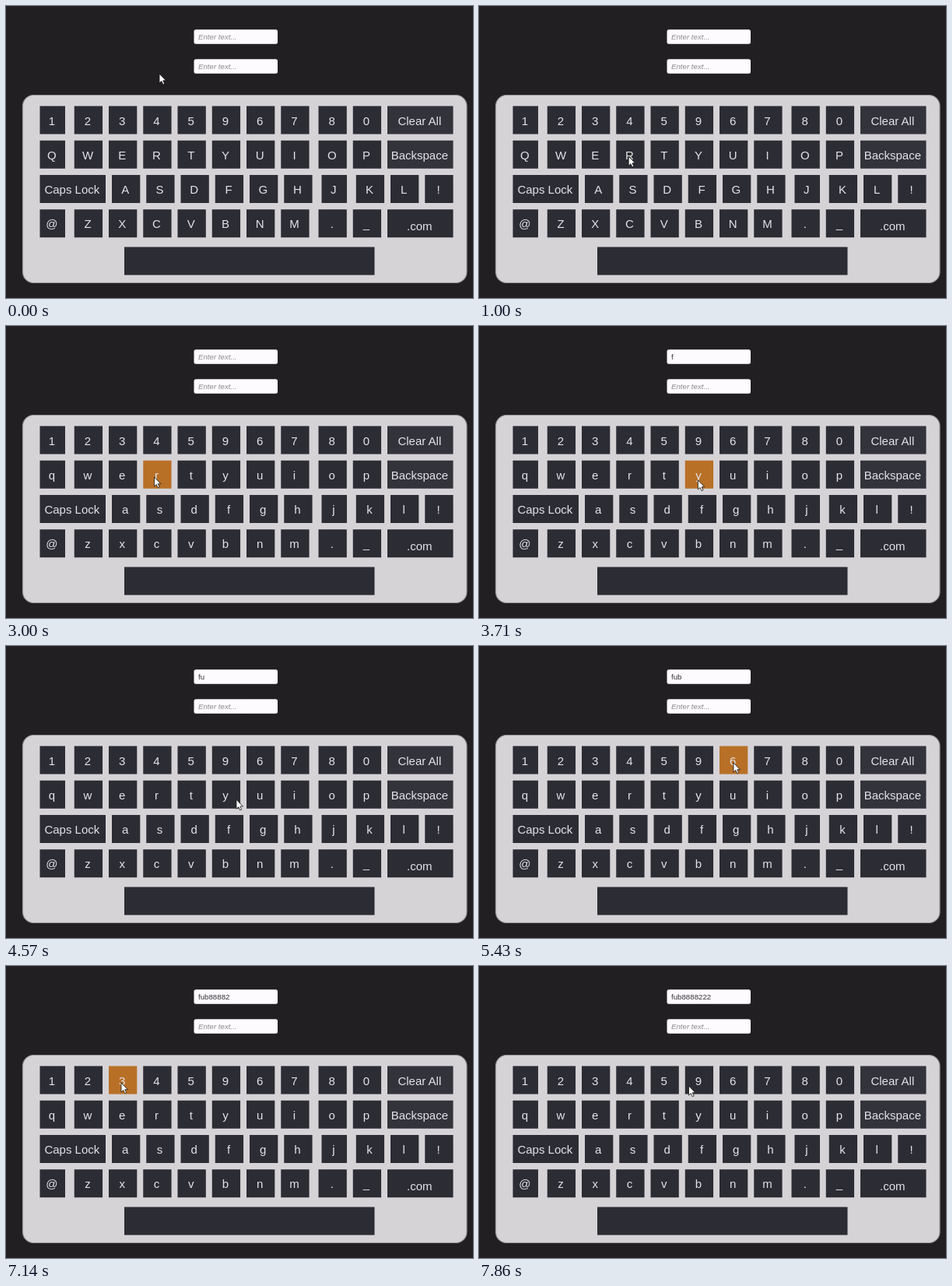
Recreate the animation shown at these times as an HTML page. Size 600 px wide and 375 px high, loop 8 s.

```html
<!DOCTYPE html>
<html lang="en">
<head>
<meta charset="utf-8">
<title>On-screen keyboard</title>
<style>
  html, body { margin: 0; width: 100%; height: 100%; overflow: hidden; background: #221f22; }
  svg { display: block; width: 100vw; height: 100vh; }
  text { font-family: "Liberation Sans", Arial, sans-serif; }
  .label { font-size: 15px; fill: #e4e3e8; text-anchor: middle; }
  .entry { font-size: 9.7px; fill: #333136; }
  .hint { font-style: italic; fill: #8d8a90; }
</style>
</head>
<body>
<svg viewBox="0 0 600 375">
  <rect width="600" height="375" fill="#221f22"/>
  <rect x="21.5" y="114.5" width="570.5" height="241" rx="14" fill="#d6d3d7" stroke="#98959a" stroke-width="1.2"/>
  <g id="fields"></g>
  <g id="keys"></g>
  <path id="cursor" d="M0 0V12L2.8 9.5L4.7 13.7L6.7 12.8L4.8 8.7H8.4Z" fill="#fff" stroke="#111" stroke-width=".8"/>
</svg>
<script>
const LOOP = 8000, STEP = 1000 / 7, CAPS_OFF = 1860;
const PITCH = 44.25, GAP = 4, LEFT = 43.5, TOP = 128.5;
const KEY_COLOR = "#2c2c34", WIDE_COLOR = "#33333b", HOT_COLOR = "#b87027";
const HINT = "Enter text...";
const $ = id => document.getElementById(id);

function add(parent, tag, attrs, content = "") {
  const node = document.createElementNS("http://www.w3.org/2000/svg", tag);
  for (const name in attrs) node.setAttribute(name, attrs[name]);
  node.textContent = content;
  return parent.appendChild(node);
}

const rows = [
  [..."1234596780", "Clear All"],
  [..."QWERTYUIOP", "Backspace"],
  ["Caps Lock", ..."ASDFGHJKL!"],
  [..."@ZXCVBNM._", ".com"]
];

const keyWidth = label => label.length > 1 ? 84.5 : "1Q@J".includes(label) ? 32.5 : 36.3;

const keys = rows.flatMap((labels, row) => {
  const y = TOP + row * PITCH;
  let column = 0;
  return labels.map(label => {
    const width = keyWidth(label);
    // Keys stand on a grid with a gap before column 8; a leading wide key pushes its row right.
    const pushed = labels[0].length > 1 && column > 0;
    const x = LEFT + column * PITCH + (column > 7 ? GAP : 0) + (pushed ? GAP : 0);
    column += label === "Caps Lock" ? 2 : 1;
    const fill = /Clear|Back/.test(label) ? WIDE_COLOR : KEY_COLOR;
    const box = add($("keys"), "rect", { x, y, width, height: 36, fill });
    const base = y + (label === ".com" ? 26.5 : 24.2);
    const text = add($("keys"), "text", { class: "label", x: x + width / 2 - 0.9, y: base }, label);
    return { label, box, text, fill };
  });
});
add($("keys"), "rect", { x: 152, y: 309.5, width: 321.5, height: 36, fill: KEY_COLOR });

const [entry] = [30.3, 68.3].map(y => {
  add($("fields"), "rect", { x: 241.5, y, width: 107.5, height: 18.5, rx: 2.5, fill: "#fdfbfe" });
  return add($("fields"), "text", { class: "entry hint", x: 247, y: y + 12.3 }, HINT);
});

// Cursor stops; until the next stop, "hot" is lit and "type" is entered at an even pace.
const stops = [
  { at: 0, x: 197, y: 87 },
  { at: 500, x: 197, y: 87 },
  { at: 1140, x: 191.5, y: 208 },
  { at: CAPS_OFF, x: 191.5, y: 208 },
  { at: 2140, x: 191, y: 203, hot: "R" },
  { at: 3000, x: 190.5, y: 194, hot: "R", type: "f" },
  { at: 3570, x: 281, y: 198, hot: "Y", type: "u" },
  { at: 4430, x: 286, y: 197 },
  { at: 4860, x: 326, y: 198, hot: "U", type: "b" },
  { at: 5290, x: 327, y: 150, hot: "6", type: "8888" },
  { at: 6290, x: 327, y: 150, hot: "6" },
  { at: 6570, x: 228, y: 150, hot: "5" },
  { at: 6860, x: 148, y: 150, hot: "3", type: "222" },
  { at: 7570, x: 148, y: 150 },
  { at: 7860, x: 269.5, y: 154 },
  { at: LOOP, x: 269.5, y: 154 }
];

const presses = stops.flatMap(({ at, type = "" }, i) =>
  [...type].map((char, k) => ({
    char,
    at: at + (stops[i + 1].at - at) * (k + 1) / (type.length + 1)
  })));

const ease = k => k * k * (3 - 2 * k);
const mix = (a, b, k) => a + (b - a) * k;

function render(time) {
  // The picture advances seven times a second, on times rounded to 10 ms.
  const t = Math.round(Math.floor((time + 4) / STEP) * STEP / 10) * 10 % LOOP;

  const next = stops.findIndex(stop => stop.at > t);
  const from = stops[next - 1], to = stops[next];
  const k = ease((t - from.at) / (to.at - from.at));
  $("cursor").setAttribute("transform", `translate(${mix(from.x, to.x, k)} ${mix(from.y, to.y, k)})`);

  for (const { label, box, text, fill } of keys) {
    text.textContent = t >= CAPS_OFF && label.length === 1 ? label.toLowerCase() : label;
    box.setAttribute("fill", label === from.hot ? HOT_COLOR : fill);
  }

  const value = presses.filter(press => press.at <= t).map(press => press.char).join("");
  entry.textContent = value || HINT;
  entry.classList.toggle("hint", !value);
}

const start = performance.now();
function frame() {
  render((performance.now() - start) % LOOP);
  requestAnimationFrame(frame);
}
frame();
</script>
</body>
</html>
```
